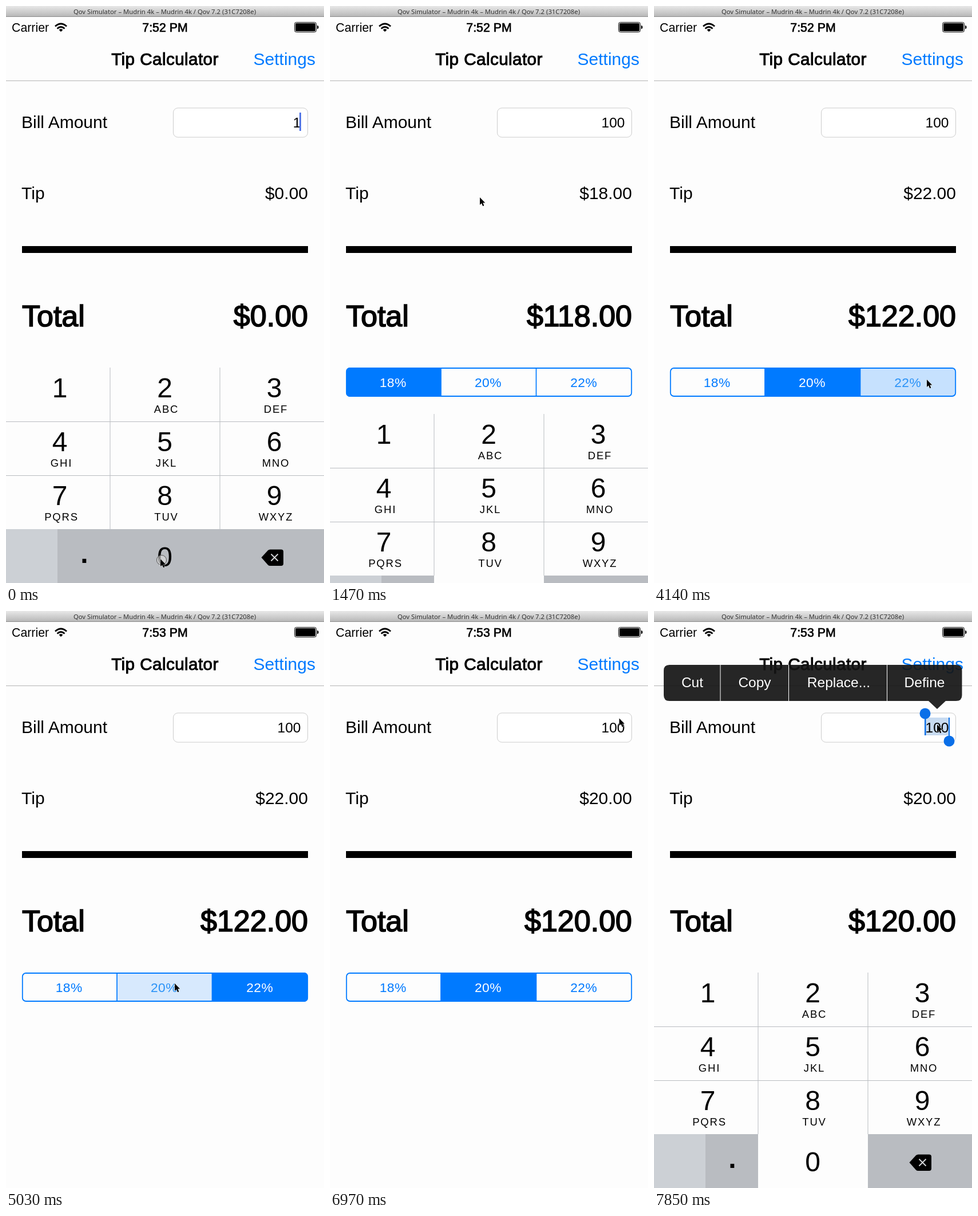
These frames come from a looping animation (556 by 1007 pixels, 8000 ms). An HTML page:

```html
<!DOCTYPE html>
<html lang="en">
<head>
<meta charset="utf-8">
<title>Tip Calculator</title>
<style>
  html, body { margin: 0; width: 100%; height: 100%; overflow: hidden; background: #fdfdfd; }
  svg { display: block; width: 556px; height: 1007px; font-family: "Liberation Sans", Arial, sans-serif; }
  .window-title { font: 11.3px "Noto Sans", sans-serif; fill: #333; }
  .status { font-size: 21.3px; }
  .title { font-size: 29.7px; letter-spacing: .4px; }
  .body { font-size: 30px; }
  .total { font-size: 52px; }
  /* A weight between regular and bold */
  .medium { stroke: #000; stroke-width: .033em; }
  .field { font-size: 24.5px; }
  .mid { text-anchor: middle; }
  .end { text-anchor: end; }
  .segment text { font-size: 22.8px; letter-spacing: .5px; text-anchor: middle; }
  .digit { font-size: 48px; text-anchor: middle; }
  .letters { font-size: 18.5px; letter-spacing: 1.8px; text-anchor: middle; }
  #menu text { font-size: 24.5px; fill: #fff; text-anchor: middle; }
</style>
</head>
<body>
<svg viewBox="0 0 556 1007">
  <defs>
    <linearGradient id="chrome" x2="0" y2="1">
      <stop stop-color="#e8e8e8"/><stop offset="1" stop-color="#b6b6b6"/>
    </linearGradient>
    <linearGradient id="glass" x2=".35" y2="1">
      <stop stop-color="#d2d2d2"/><stop offset=".55" stop-color="#efefef"/><stop offset="1" stop-color="#fff"/>
    </linearGradient>
    <clipPath id="segmentClip"><rect x="28" y="631" width="500" height="51" rx="7"/></clipPath>
  </defs>

  <rect width="556" height="1007" fill="#fdfdfd"/>
  <rect width="556" height="19" fill="url(#chrome)"/>
  <path d="M0 18.5H556" stroke="#8c8c8c"/>
  <text class="window-title mid" x="277.5" y="14">Qov Simulator – Mudrin 4k – Mudrin 4k / Qov 7.2 (31C7208e)</text>

  <text class="status" x="10" y="45">Carrier</text>
  <g fill="none" stroke="#000" stroke-width="2.7">
    <path d="M86 35.5Q96 26.500 106 35.5M89.500 39.500Q96 33.500 102.500 39.500"/>
    <path d="M92.500 41.500Q96 38.500 99.500 41.500L96 45Z" fill="#000" stroke="none"/>
  </g>
  <text id="clock" class="status medium mid" x="278" y="45"></text>
  <rect x="504.500" y="28.500" width="38" height="17" rx="3" fill="none" stroke="#000"/>
  <rect x="506" y="30" width="35" height="14" rx="1.5"/>
  <path d="M544 34q2.500 0 2.500 3t-2.500 3z"/>

  <text class="title medium mid" x="278" y="103">Tip Calculator</text>
  <text class="body end" x="541" y="102.500" fill="#007aff">Settings</text>
  <path d="M0 130.500H556" stroke="#b4b4b4"/>

  <text class="body" x="27" y="213">Bill Amount</text>
  <rect x="292.500" y="178" width="235" height="51" rx="8" fill="#fff" stroke="#ccc"/>
  <g id="selection" fill="#0a6fe8">
    <rect x="474" y="186" width="42" height="31" fill="#c8dbf1"/>
    <path d="M473 179h2.500v38H473zM515 186h2v41h-2z"/>
    <circle cx="474" cy="179" r="9.500"/><circle cx="516" cy="227" r="9.500"/>
  </g>
  <text id="bill" class="field end" x="515.500" y="212"></text>
  <rect id="caret" x="513" y="186" width="3" height="32" fill="#5578e6"/>

  <text class="body" x="27" y="337">Tip</text>
  <text id="tip" class="body end" x="528" y="337"></text>
  <rect x="28" y="419" width="500" height="12"/>
  <text class="total medium" x="28" y="559">Total</text>
  <text id="total" class="total medium end" x="528" y="559"></text>

  <g id="segments" clip-path="url(#segmentClip)"></g>
  <rect x="28.800" y="632" width="498.400" height="49" rx="6" fill="none" stroke="#007aff" stroke-width="1.800"/>
  <path d="M194 632v49M360.500 632v49" stroke="#007aff" stroke-width="1.700"/>

  <g id="keyboard">
    <rect y="631" width="556" height="376" fill="#fdfdfd"/>
    <path d="M0 725.500H556M0 819.500H556M182 631V913M374 631V913" stroke="#b9bcc0"/>
    <g id="keys"></g>
    <rect y="913" width="556" height="94" fill="#b9bcc1"/>
    <rect y="913" width="90" height="94" fill="#ccd0d5"/>
    <rect id="zeroKey" x="182" y="913" width="192" height="94"/>
    <text class="digit" x="137" y="972" font-weight="bold">.</text>
    <text class="digit" x="277.500" y="978">0</text>
    <path d="M446.500 962.500 458 950q1.500-1.500 4-1.500H481q4 0 4 4V973q0 4-4 4H462q-2.500 0-4-1.500Z"/>
    <path d="M463.500 956.500l12 12m0-12-12 12" stroke="#d6d8db" stroke-width="1.800"/>
  </g>

  <g id="menu">
    <path d="M27 94H528q10.500 0 10.500 10V147q0 10-10.500 10H510L495 171 480 157H27q-10 0-10-10V104q0-10 10-10Z" fill="#141414" fill-opacity=".92"/>
    <path d="M116 94v63M235.500 94v63M407.500 94v63" stroke="#fff"/>
    <text x="67" y="133">Cut</text>
    <text x="176" y="133">Copy</text>
    <text x="323" y="133">Replace...</text>
    <text x="473" y="133">Define</text>
  </g>

  <g id="loupe">
    <path d="M414 85H620q10 0 10 10V131q0 10-10 10H541L517 165 493 141H414q-10 0-10-10V95q0-10 10-10Z" fill="url(#glass)" stroke="#999"/>
    <path d="M408 90H517q8 0 8 8V137" fill="none" stroke="#ccc"/>
    <path d="M406 138H495L517 160 539 138H630" fill="none" stroke="#fff" stroke-width="3"/>
    <text x="486.500" y="129.500" text-anchor="middle" font-size="29.500">100</text>
  </g>

  <g id="pointer">
    <circle id="touch" cx="2" cy="2" r="8.500" fill="#ddd" fill-opacity=".6" stroke="#555"/>
    <path d="M0 0V13L3 10.300 5.200 15.200 7.400 14.200 5.300 9.500H9.300Z" stroke="#fff" stroke-width="1" paint-order="stroke"/>
  </g>
</svg>
<script>
const LOOP = 8000, STEP = 148.1, LAST_STEP = 53;
const KEYBOARD_HEIGHT = 376, KEYBOARD_HIDE = 1437.7, KEYBOARD_SHOW = 7368;
const el = id => document.getElementById(id);
const show = (id, on) => el(id).setAttribute('visibility', on ? 'visible' : 'hidden');
const within = (t, from, to) => t >= from && t < to;
const money = n => '$' + n.toFixed(2);

const letters = ['', 'ABC', 'DEF', 'GHI', 'JKL', 'MNO', 'PQRS', 'TUV', 'WXYZ'];
el('keys').innerHTML = letters.map((label, i) => {
  const x = [94, 277.5, 469][i % 3], y = 683 + 94 * Math.floor(i / 3);
  return `<text class="digit" x="${x}" y="${y}">${i + 1}</text>
    <text class="letters" x="${x + 3}" y="${y + 27}">${label}</text>`;
}).join('');

const rates = [18, 20, 22];
const segmentEdges = [28, 193.5, 360.5, 528];
el('segments').innerHTML = rates.map((rate, i) => {
  const x = segmentEdges[i], width = segmentEdges[i + 1] - x;
  return `<g class="segment"><rect x="${x}" y="631" width="${width}" height="51" fill="#007aff"/>
    <text x="${x + width / 2 - .5}" y="665">${rate}%</text></g>`;
}).join('');
const segments = [...document.querySelectorAll('.segment')];

// [time, x, y] of the pointer tip
const pointerPath = [
  [0, 270, 965], [650, 270, 965], [1330, 262, 334], [1490, 262, 334],
  [2600, 306.5, 651], [3330, 306.5, 651], [3980, 477, 652], [4480, 477, 652],
  [5030, 295, 650], [5250, 295, 650], [5620, 287, 593], [6670, 516, 177],
  [7260, 495, 198], [LOOP, 495, 198]
];

function pointerAt(t) {
  const i = pointerPath.findIndex(p => p[0] > t);
  const [t0, x0, y0] = pointerPath[i - 1], [t1, x1, y1] = pointerPath[i];
  const p = (t - t0) / (t1 - t0), e = p * p * (3 - 2 * p);
  return [x0 + (x1 - x0) * e, y0 + (y1 - y0) * e];
}

// Critically damped settling from 1 to 0
function settle(ms) {
  const x = Math.max(0, ms) / 50;
  return (1 + x) * Math.exp(-x);
}

function drawSegments(t) {
  const selected = t < 2900 ? 0 : within(t, 4250, 5150) ? 2 : 1;
  const pressed = within(t, 2650, 2900) || within(t, 5000, 5150) ? 1 : within(t, 3980, 4250) ? 2 : -1;
  segments.forEach((segment, i) => {
    const [box, label] = segment.children;
    box.setAttribute('fill-opacity', i === selected ? 1 : i === pressed ? (i === 1 ? .15 : .22) : 0);
    label.setAttribute('fill', i === selected ? '#fff' : i === pressed ? '#2b93f7' : '#007aff');
  });
}

function draw(t) {
  const typing = t < KEYBOARD_HIDE;
  const rate = typing ? 0 : t < 2900 ? 18 : within(t, 4100, 5150) ? 22 : 20;
  el('clock').textContent = t < 4400 ? '7:52 PM' : '7:53 PM';
  el('bill').textContent = t < 100 ? '1' : t < 520 ? '10' : '100';
  el('tip').textContent = money(rate);
  el('total').textContent = money(typing ? 0 : 100 + rate);
  drawSegments(t);

  const hidden = t < LOOP / 2 ? 1 - settle(t - KEYBOARD_HIDE) : settle(t - KEYBOARD_SHOW);
  el('keyboard').setAttribute('transform', `translate(0 ${Math.round(hidden * KEYBOARD_HEIGHT)})`);
  const zeroDown = t < 100 || within(t, 400, 560);
  el('zeroKey').setAttribute('fill', zeroDown ? '#b9bcc1' : '#fdfdfd');

  show('caret', t < 1000);
  show('selection', t > 7380);
  show('menu', t > 7500);
  el('menu').setAttribute('opacity', t < 7650 ? .86 : 1);

  show('loupe', within(t, 7380, 7650));
  const zoom = t < 7500 ? 1.43 : 1;
  el('loupe').setAttribute('transform', `translate(517 215) scale(${zoom}) translate(-517 -215)`);

  const [x, y] = pointerAt(t);
  el('pointer').setAttribute('transform', `translate(${x.toFixed(1)} ${y.toFixed(1)})`);
  show('touch', zeroDown);
}

function tick() {
  const t = performance.now() % LOOP;
  draw(Math.min(LAST_STEP, Math.floor((t + 20) / STEP)) * STEP);
  requestAnimationFrame(tick);
}
tick();
</script>
</body>
</html>
```
